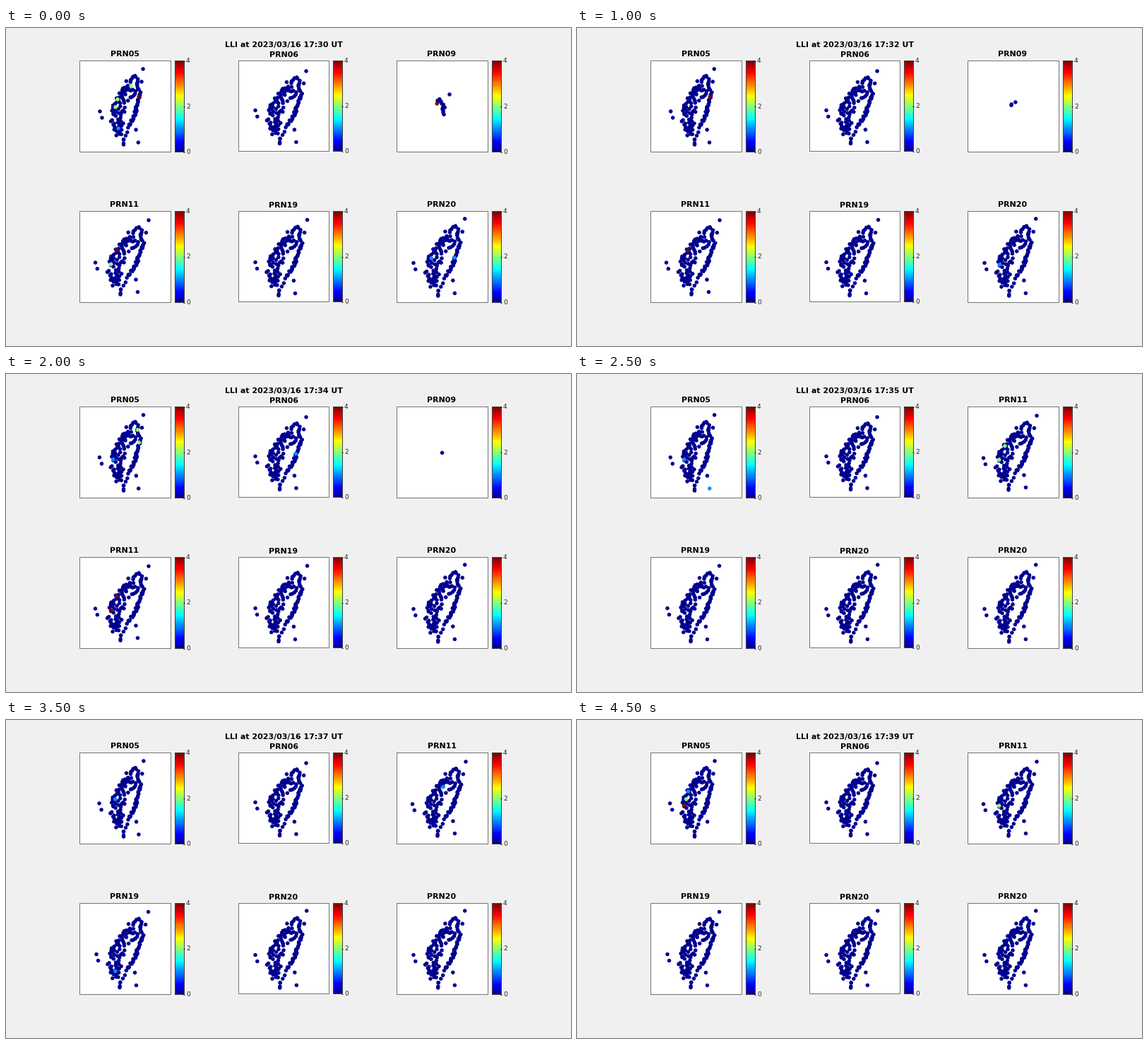
Write a matplotlib script that moves like this. It is 800 px wide and 450 px high and loops after 5 s.

```python
import numpy as np
import matplotlib.pyplot as plt
from matplotlib.animation import FuncAnimation
from matplotlib.patches import Rectangle

W, H, DPI = 800, 450, 100
FRAMES, STEP = 10, 500
PX = 72 / DPI
plt.rcParams["font.family"] = "DejaVu Sans"
rng = np.random.default_rng(11)


def jet(levels=64):
    """Classic jet map with a quarter-ramp at both ends."""
    i = np.arange(1, levels + 1) / (levels / 4)
    ramp = lambda mid: np.clip(1.5 - np.abs(i - mid), 0, 1)
    return np.column_stack([ramp(3), ramp(2), ramp(1), np.ones(levels)])


JET = jet()


def shade(value):
    """Colour of a flag from 0 to 4; None hides the station."""
    if value is None:
        return (0, 0, 0, 0)
    return JET[min(int(value / 4 * 64), 63)]


def strand(verts, count, jitter):
    """Evenly spaced stations along a polyline, slightly scattered."""
    x, y = np.array(verts, float).T
    d = np.r_[0, np.cumsum(np.hypot(np.diff(x), np.diff(y)))]
    t = np.linspace(0, d[-1], count)
    pts = np.column_stack([np.interp(t, d, x), np.interp(t, d, y)])
    return pts + rng.uniform(-jitter, jitter, pts.shape)


def band(left, right, count, tries=4):
    """Scatter stations between two edges, keeping them apart."""
    (lx, ly), (rx, ry) = np.transpose(left), np.transpose(right)
    pts = np.empty((0, 2))
    while len(pts) < count:
        y = rng.uniform(ly[0], ly[-1], tries)
        x = rng.uniform(np.interp(y, ly, lx), np.interp(y, ry, rx))
        new = np.column_stack([x, y])
        gap = np.hypot(*(new[:, None] - pts).T).min(axis=0, initial=99)
        pts = np.vstack([pts, new[gap.argmax()]])
    return pts


# Station network in pixels from a panel's corner
REMOTE = [(90, 12), (88, 30), (29, 72), (32, 81), (80, 98),
          (62.5, 112), (62.5, 117), (62.5, 119)]
NAMED = {"A": (73, 36), "B": (84, 51), "C": (54, 55), "D": (51, 66),
         "E": (55, 96), "F": (62, 55), "G": (82, 33), "H": (48, 75),
         "J": (65, 48), "K": (80, 66), "S": (83.3, 116)}
NAMES = list(NAMED)
STATIONS = np.vstack([
    band([(66, 29), (48, 61), (43, 83), (52, 108)],
         [(74, 29), (65, 54), (64, 76), (59, 108)], 60),
    strand([(73, 28), (77, 22), (82, 25), (82, 38), (86, 43), (83, 58)], 18, 1),
    strand([(82, 58), (79, 76), (72, 90)], 20, 1.7),
    strand([(71, 90), (67, 102), (62, 111)], 5, 0.7),
    strand([(67, 42), (80, 43), (70, 56)], 10, 1.5),
    REMOTE, list(NAMED.values())])

# Where each satellite sees the north, west and south stations
VIEW = {"05": [(90, 12), (29, 72), (62.5, 119)],
        "06": [(96, 15), (24, 70.5), (58.5, 117.5)],
        "11": [(98, 13), (22.5, 73), (58, 118)],
        "19": [(97.5, 12.5), (24, 72.5), (57, 119.5)],
        "20": [(96.7, 11), (24, 73.5), (58.7, 120)]}
EARLY = ["05", "06", "09", "11", "19", "20"]
LATE = ["05", "06", "11", "19", "20", "20"]

# Flags by minute, satellite and station
EVENTS = [
    {"05": dict(A=2, B=4, C=2, D=2, E=1), "11": dict(C=4, H=2),
     "20": dict(D=1, K=1)},
    {"05": dict(B=4, C=4), "11": dict(C=4), "20": dict(D=1, H=1)},
    {"05": dict(B=4), "11": dict(C=4), "20": dict(H=1)},
    {"05": dict(B=2, E=1, F=4, G=1), "11": dict(C=4), "19": dict(E=1),
     "20": dict(H=2)},
    {"05": dict(B=2, G=2, H=1), "06": dict(K=1), "11": dict(C=4, H=4)},
    {"05": dict(H=1, S=1), "11": dict(C=2, H=2)},
    {"05": dict(H=1)},
    {"05": dict(D=1), "11": dict(J=1), "19": dict(E=1)},
    {"05": dict(D=1), "11": dict(H=2)},
    {"05": dict(C=1, D=2, H=4, S=None), "11": dict(H=2)},
]

# The setting satellite: a swarm that thins out and closes on its centre
CENTRE = np.array([64.3, 64.5])
SWARM = np.vstack([[(10.7, -16.5), (-7, -3.5)],
                   strand([(-5, -8), (0, -4), (4, 13)], 12, 2.2) - (0, 1)])
COUNTS = [14, 9, 3, 1]


def affine(p):
    p = np.asarray(p, float)
    return np.column_stack([p, np.ones(len(p))])


def swarm(k):
    k = min(k, 3)
    pts = CENTRE + SWARM[:COUNTS[k]] * (1 - k / 3)
    cols = np.tile(shade(0), (len(pts), 1))
    if k == 0:
        cols[1] = shade(4)
    return pts, cols


def network(sat, k):
    pts = affine(STATIONS) @ np.linalg.solve(affine(VIEW["05"]), VIEW[sat])
    if sat == "05":
        pts[:, 0] += 0.018 * k * (pts[:, 0] - 62.5) / 5 * 1.2
    cols = np.tile(shade(0), (len(pts), 1))
    for name, value in EVENTS[k].get(sat, {}).items():
        cols[NAMES.index(name) - len(NAMES)] = shade(value)
    return pts, cols


fig = plt.figure(figsize=(W / DPI, H / DPI), dpi=DPI, facecolor="#f0f0f0")
ax = fig.add_axes([0, 0, 1, 1])
ax.axis("off")


def label(x, y, s, size=11, **kw):
    return ax.text(x, y, s, fontsize=size * PX, va="baseline", **kw)


def box(x0, y0, x1, y1, face, edge, z):
    """One-pixel frame whose lines fill whole pixels."""
    ax.add_patch(Rectangle((x0 + 0.5, y0 + 0.5), x1 - x0, y1 - y0, fc=face,
                           ec=edge, lw=PX, snap=False, zorder=z))


def panel(col, row):
    x, y = (104, 329, 553)[col], (46, 259)[row]
    size = 128 if col == 1 else 129
    box(x, y, x + size, y + size, "white", "#747474", 1)
    left, right = x + size + 6, x + size + 19
    ax.imshow(JET[::-1, None], extent=(left, right + 1, y + size + 1, y),
              aspect="auto", interpolation="nearest", zorder=2)
    box(left, y, right, y + size, "none", "#404040", 3)
    for i, s in enumerate("420"):
        ty = y + i * size / 2
        ax.plot([right - 1, right + 0.5], [ty + 0.5] * 2, color="#262626",
                lw=0.7 * PX, zorder=3)
        label(right + 3, ty + 3, s, 9, color="#262626")
    title = label(x + 64, y - 6 + (col == 1), "", ha="center", weight="bold")
    dots = ax.scatter([], [], s=(5.5 * PX) ** 2, linewidths=0, zorder=4)
    return title, dots, (x, y)


panels = [panel(c, r) for r in range(2) for c in range(3)]
heading = label(393, 27, "", ha="center", weight="bold")
ax.set_xlim(0, W)
ax.set_ylim(H, 0)


def update(k):
    heading.set_text(f"LLI at 2023/03/16 17:{30 + k} UT")
    for (title, dots, corner), sat in zip(panels, EARLY if k < 5 else LATE):
        pts, cols = swarm(k) if sat == "09" else network(sat, k)
        title.set_text("PRN" + sat)
        dots.set_offsets(pts + corner)
        dots.set_facecolors(cols)
    return []


anim = FuncAnimation(fig, update, frames=FRAMES, interval=STEP,
                     init_func=lambda: update(0), repeat=True, repeat_delay=0)
plt.show()
```
